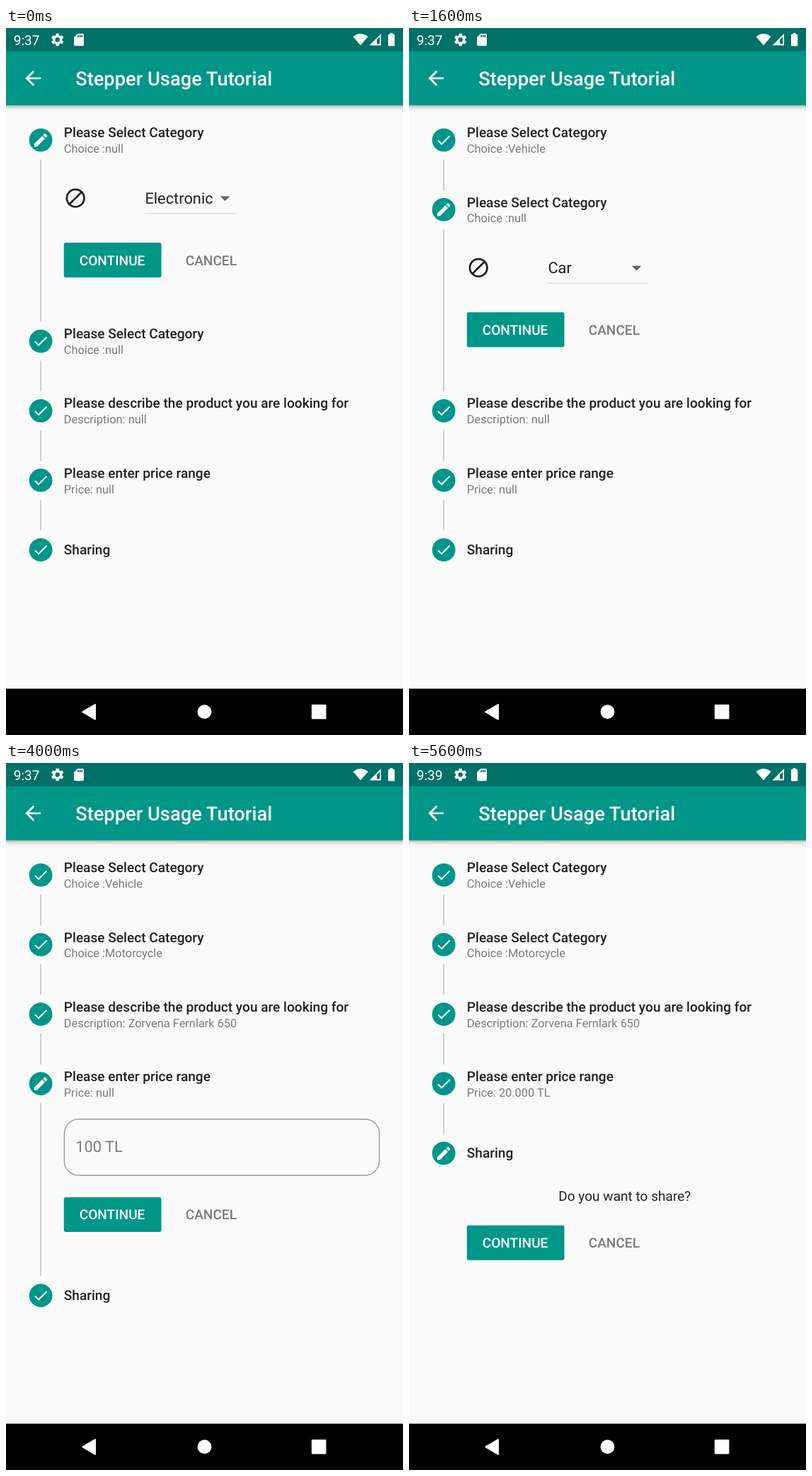
Write an HTML page that moves like this. It is 561 by 998 pixels and loops after 6.4 s.

```html
<!DOCTYPE html>
<html lang="en">
<head>
<meta charset="utf-8">
<title>Stepper</title>
<style>
html, body { margin: 0; width: 100%; height: 100%; overflow: hidden; background: #fafafa; }
svg { display: block; width: 100vw; height: 100vh; }
text { font-family: Roboto, sans-serif; font-size: 19.09px; fill: #212121; text-rendering: geometricPrecision; white-space: pre; }
.medium { font-weight: 500; }
.small { font-size: 16.36px; }
.large { font-size: 21.82px; }
.dim { fill: #7a7a7a; }
.red { fill: #f44336; }
.error { fill: #d32f2f; }
.white { fill: #fff; }
</style>
</head>
<body>
<svg id="stage" viewBox="0 0 561 998">
  <defs>
    <linearGradient id="shade" x1="0" y1="0" x2="0" y2="1">
      <stop offset="0" stop-color="#000" stop-opacity=".3"/>
      <stop offset=".35" stop-color="#000" stop-opacity=".12"/>
      <stop offset="1" stop-color="#000" stop-opacity="0"/>
    </linearGradient>
  </defs>
  <rect width="561" height="998" fill="#fafafa"/>
  <rect y="109" width="561" height="8" fill="url(#shade)"/>
  <rect y="32" width="561" height="77.1" fill="#009688"/>
  <rect width="561" height="32.7" fill="#007166"/>
  <text id="clock" class="white" x="10.7" y="23.9"></text>
  <text class="white medium" x="98.2" y="80.9" style="font-size:27.27px">Stepper Usage Tutorial</text>
  <g id="bar" fill="#fff"></g>
  <path d="M490.5 12.2Q501 3.6 511.5 12.2L501 24.6z" fill="#fff"/>
  <path d="M513.5 24.4L530 8V24.4zM524 16.6V22.6H528.2V12.4z" fill="#fff" fill-rule="evenodd"/>
  <rect y="932.6" width="561" height="65.4" fill="#000"/>
  <g fill="#fff" stroke="#fff" stroke-width="2" stroke-linejoin="round">
    <path d="M108.3 965.4L126 955V975.8z"/>
    <circle cx="280.5" cy="965.3" r="9"/>
    <rect x="432.8" y="956" width="18.6" height="18.6"/>
  </g>
  <g id="steps"></g>
</svg>
<script>
const DP = 561 / 411.4, LEFT = 81.8, STEP = 72 * DP, HOLD = 800;

const ICONS = {
  edit: 'M3 17.25V21h3.75L17.81 9.94l-3.75-3.75L3 17.25zM20.71 7.04c.39-.39.39-1.02 0-1.41l-2.34-2.34c-.39-.39-1.02-.39-1.41 0l-1.83 1.83 3.75 3.75 1.83-1.83z',
  check: 'M9 16.17L4.83 12l-1.42 1.41L9 19 21 7l-1.41-1.41z',
  back: 'M20 11H7.83l5.59-5.59L12 4l-8 8 8 8 1.41-1.41L7.83 13H20v-2z',
  drop: 'M7 10l5 5 5-5z',
  block: 'M12 2a10 10 0 1 0 0 20a10 10 0 1 0 0-20zM4 12c0-4.42 3.58-8 8-8 1.85 0 3.55.63 4.9 1.69L5.69 16.9C4.63 15.55 4 13.85 4 12zm8 8c-1.85 0-3.55-.63-4.9-1.69L18.31 7.1C19.37 8.45 20 10.15 20 12c0 4.42-3.58 8-8 8z',
  car: 'M18.92 6C18.7 5.4 18.2 5 17.5 5h-11c-.66 0-1.2.4-1.42 1L3 12v8q0 1 1 1h1q1 0 1-1v-1h12v1q0 1 1 1h1q1 0 1-1v-8zM6.5 16a1.5 1.5 0 1 1 0-3a1.5 1.5 0 1 1 0 3zm11 0a1.5 1.5 0 1 1 0-3a1.5 1.5 0 1 1 0 3zM5 11l1.5-4.5h11L19 11z',
  bike: 'M19.44 9.03L15.41 5H11v2h3.59l2 2H5c-2.8 0-5 2.2-5 5s2.2 5 5 5c2.46 0 4.45-1.69 4.9-4h1.65l2.77-2.77c-.21.54-.32 1.14-.32 1.77 0 2.8 2.2 5 5 5s5-2.2 5-5c0-2.65-1.97-4.77-4.56-4.97zM7.82 15C7.4 16.15 6.28 17 5 17c-1.63 0-3-1.37-3-3s1.37-3 3-3c1.28 0 2.4.85 2.82 2H5v2h2.82zM19 17a3 3 0 1 1 0-6a3 3 0 1 1 0 6z',
  card: 'M18 2h-8L4 8v12q0 2 2 2h12q2 0 2-2V4q0-2-2-2zm-6 6h-2V4h2zm3 0h-2V4h2zm3 0h-2V4h2z',
  battery: 'M15.67 4H14V2h-4v2H8.33Q7 4 7 5.33v15.34Q7 22 8.33 22h7.34Q17 22 17 20.67V5.33Q17 4 15.67 4z'
};

// Cog outline: eight-unit body with six blunt teeth and a round hole.
ICONS.gear = (() => {
  const point = (r, a) => `${(12 + r * Math.cos(a)).toFixed(2)} ${(12 + r * Math.sin(a)).toFixed(2)}`;
  const pts = [];
  for (let i = 0; i < 6; i++) {
    const a = Math.PI / 2 + i * Math.PI / 3;
    pts.push(point(7.4, a - .34), point(10, a - .24), point(10, a + .24), point(7.4, a + .34));
  }
  return `M${pts.join('L')}zM12 8.4a3.6 3.6 0 1 0 0 7.2a3.6 3.6 0 1 0 0-7.2z`;
})();

const icon = (name, x, y, scale, fill) =>
  `<path d="${ICONS[name]}" fill="${fill}" fill-rule="evenodd" transform="translate(${x} ${y}) scale(${scale}) translate(-12 -12)"/>`;
const text = (x, y, str, cls = '', extra = '') =>
  `<text x="${x}" y="${y}" class="${cls}" ${extra}>${str}</text>`;

function marker(y, kind) {
  if (kind === 'alert')
    return `<path d="M32.7 ${y + 14.6}L49.1 ${y - 13.8}L65.5 ${y + 14.6}z" fill="#f44336"/>` +
      text(49.1, y + 9.2, '!', 'small white', 'text-anchor="middle"');
  return `<circle cx="49.1" cy="${y}" r="16.4" fill="#009688"/>` + icon(kind, 49.1, y, .75 * DP, '#fff');
}

function buttons(y) {
  return `<rect x="${LEFT}" y="${y}" width="137.7" height="49.1" rx="2.7" fill="#009688"/>` +
    text(103.7, y + 31.4, 'CONTINUE', 'medium white') +
    text(253.7, y + 31.4, 'CANCEL', 'medium dim');
}

const picker = (name, value, right) => ({
  gap: 208.2 * DP,
  draw: y => icon(name, 98.2, y + 82, DP, '#212121') +
    text(196.4, y + 89.7, value, 'large') +
    icon('drop', right - 16.4, y + 82, DP, '#616161') +
    `<rect x="196.2" y="${y + 103.2}" width="${right - 196.2}" height="1.2" fill="#d6d6d6"/>` +
    buttons(y + 144.9)
});

const field = (value, cls, error) => ({
  gap: error ? 329 : 299,
  draw: y => `<rect x="82.4" y="${y + 50}" width="445.2" height="79.3" rx="20.4" fill="none" stroke="${error ? '#d32f2f' : '#9a9a9a'}" stroke-width="1.36"/>` +
    text(98.2, y + 96.2, value, 'large ' + cls) +
    (error ? text(98.2, y + 156.2, error, 'small error') : '') +
    buttons(y + (error ? 190 : 160.2))
});

const share = {
  gap: 0,
  draw: y => text(304.8, y + 67, 'Do you want to share?', '', 'text-anchor="middle"') + buttons(y + 101.7)
};

const TITLES = ['Please Select Category', 'Please Select Category',
  'Please describe the product you are looking for', 'Please enter price range', 'Sharing'];
const LABELS = ['Choice :', 'Choice :', 'Description: ', 'Price: '];
const ANSWERS = ['Vehicle', 'Motorcycle', 'Zorvena Fernlark 650', '20.000 TL'];

// done: number of answered steps; open: index of the expanded step
const SCENES = [
  { open: 0, done: 0, body: picker('block', 'Electronic', 326) },
  { open: 0, done: 1, body: picker('car', 'Vehicle', 326) },
  { open: 1, done: 1, body: picker('block', 'Car', 338) },
  { open: 1, done: 2, body: picker('bike', 'Motorcycle', 338) },
  { open: 2, done: 2, alert: true, body: field('Fern', '', 'Cannot lower then 6 characters') },
  { open: 3, done: 3, body: field('100 TL', 'dim') },
  { open: 3, done: 4, clock: '9:38', body: field('20.000 TL', '') },
  { open: 4, done: 4, clock: '9:39', body: share }
];

function drawScene({ open, done, alert, body }) {
  let y = 158.2, out = '';
  TITLES.forEach((title, i) => {
    const active = i === open, bad = active && alert;
    const next = y + (active ? body.gap : STEP);
    if (i < TITLES.length - 1)
      out += `<rect x="48.4" y="${y + 27.3}" width="1.36" height="${next - y - 54.6}" fill="#bdbdbd"/>`;
    out += marker(y, bad ? 'alert' : active ? 'edit' : 'check');
    out += text(LEFT, y + (LABELS[i] ? -3.8 : 6.4), title, 'medium' + (bad ? ' red' : ''));
    if (LABELS[i])
      out += text(LEFT, y + 18.1, LABELS[i] + (i < done ? ANSWERS[i] : 'null'), 'small ' + (bad ? 'red' : 'dim'));
    if (active) out += body.draw(y);
    y = next;
  });
  return out;
}

const byId = id => document.getElementById(id);
byId('bar').innerHTML = icon('back', 38.2, 71, DP, '#fff') + icon('gear', 72.7, 16.6, .9, '#fff') +
  icon('card', 103, 16.6, .87, '#fff') + icon('battery', 544.6, 16.2, .93, '#fff');

let shown = -1;
function render(ms) {
  const i = Math.floor(ms / HOLD) % SCENES.length;
  if (i === shown) return;
  shown = i;
  byId('clock').textContent = SCENES[i].clock || '9:37';
  byId('steps').innerHTML = drawScene(SCENES[i]);
}

const start = performance.now();
function tick() {
  render(performance.now() - start);
  requestAnimationFrame(tick);
}
tick();
</script>
</body>
</html>
```
